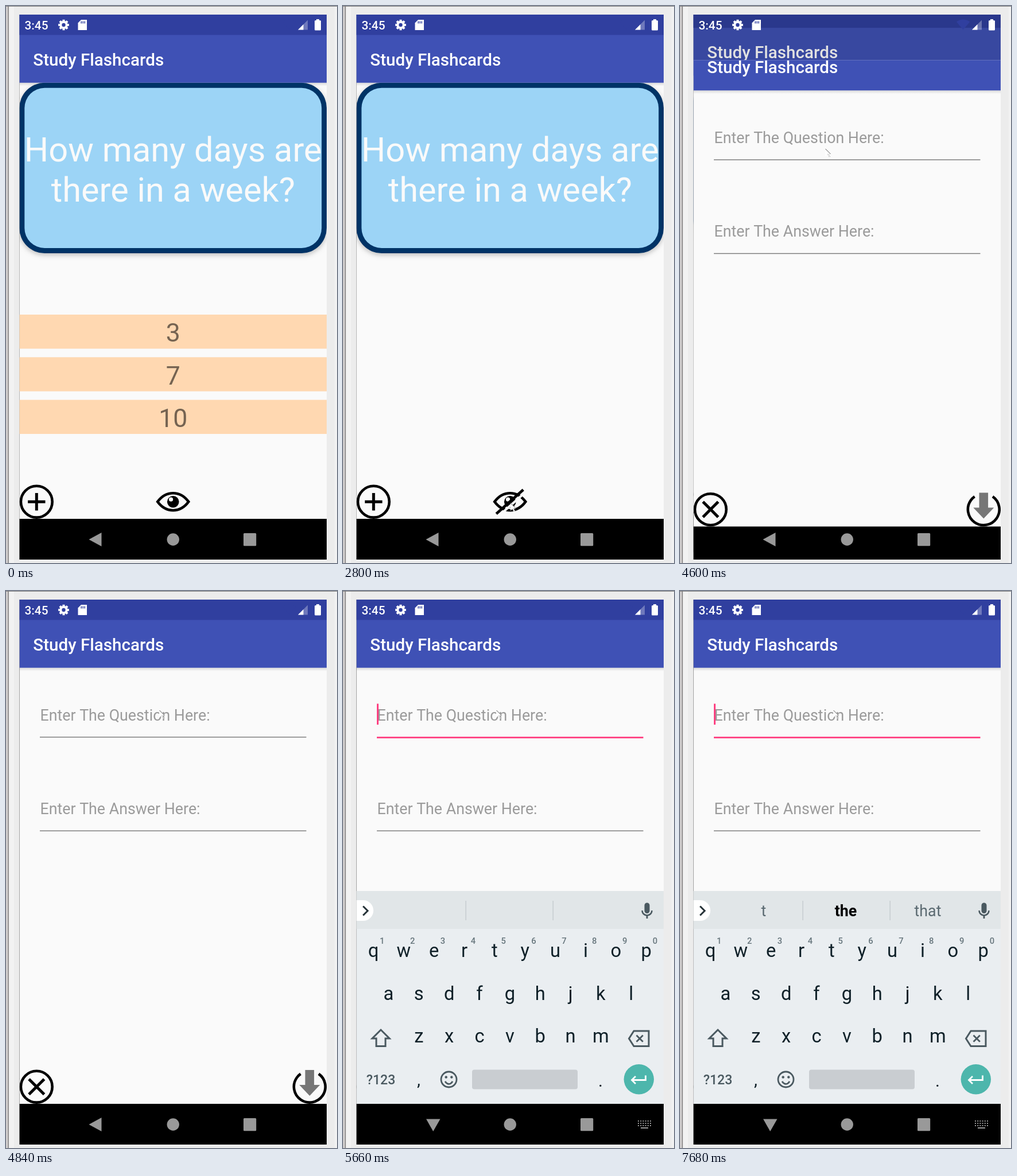
Write an HTML page with a canvas that moves like this. It is 577 by 971 pixels and loops after 8000 ms.

```html
<!DOCTYPE html>
<html lang="en">
<head>
<meta charset="utf-8">
<title>Study Flashcards</title>
<style>
html, body { margin: 0; width: 100%; height: 100%; overflow: hidden; background: #ececec; }
canvas { display: block; width: 577px; height: 971px; }
</style>
</head>
<body>
<canvas id="stage" width="577" height="971"></canvas>
<script>
const ctx = document.getElementById('stage').getContext('2d');
const LOOP = 8000, FRAME = 120, KEY_GAP = 75;
const L = 23.3, R = 559, T = 15, B = 965, BAR = 50.5, BODY = 133.8, NAV = 894, MID = 291.25;
const PINK = '#ff4081', PAPER = '#fafafa', SLATE = '#4a5960', INK = '#0f2028', BLACK = '#000', WHITE = '#fff';
const FIELD = 26.775, ICON_Y = 864.2, ICON_L = L + 30, ICON_R = R - 29.7;

const REVEAL = 2800, FOCUS = 5270, IME = 5420, CLEAR = 7560;
const moves = [
  { start: 1210, span: 840, from: [541, 538], to: [292, 866], lift: 0 },
  { start: 3240, span: 720, from: [292, 866], to: [56, 853], lift: 36 },
  { start: 4240, span: 600, from: [56, 853], to: [267, 207], lift: 0 }
];
const words = [
  { start: 6090, word: 'How ', hints: ['are', 'many', 'much'] },
  { start: 6630, word: 'is ', hints: ['t', 'the', 'that'] },
  { start: 7030, word: 't' }
];

// Progress 0..1 of a motion, held for a whole frame at a time.
const progress = (t, start, span) =>
  Math.min(1, Math.max(0, Math.floor((t - start) / FRAME) * FRAME / span));
const easeOut = k => 1 - (1 - k) ** 3;
const easeSlide = k => 1 - (1 - k ** 3) ** 8;

function box(x, y, x2, y2, color) {
  ctx.fillStyle = color;
  ctx.fillRect(x, y, x2 - x, y2 - y);
}
function round(x, y, x2, y2, r, color) {
  ctx.fillStyle = color;
  ctx.beginPath();
  ctx.roundRect(x, y, x2 - x, y2 - y, r);
  ctx.fill();
}
function disc(x, y, r, color) {
  ctx.fillStyle = color;
  ctx.beginPath();
  ctx.arc(x, y, r, 0, 7);
  ctx.fill();
}
function stroke(width, color) {
  ctx.lineWidth = width;
  ctx.strokeStyle = color;
  ctx.stroke();
}
function ring(x, y, r, width, color, from = 0, to = Math.PI * 2) {
  ctx.beginPath();
  ctx.arc(x, y, r, from, to);
  stroke(width, color);
}
function trace(points) {
  ctx.beginPath();
  points.forEach(p => ctx.lineTo(...p));
}
function poly(points, color) {
  trace(points);
  ctx.fillStyle = color;
  ctx.fill();
}
function line(points, width, color) {
  trace(points);
  stroke(width, color);
}
function spokes(x, y, count, r, width, color, turn = 0) {
  for (let i = 0; i < count; i++) {
    const a = turn + i * 2 * Math.PI / count;
    line([[x, y], [x + r * Math.cos(a), y + r * Math.sin(a)]], width, color);
  }
}
function chevron(x, y, w, width, color) {
  line([[x - w, y - Math.abs(w)], [x, y], [x - w, y + Math.abs(w)]], width, color);
}
function blockArrow(x, tip, neck, end, half, stem) {
  const side = [[stem, end], [stem, neck], [half, neck]];
  trace([[x, tip], ...side.map(([d, y]) => [x - d, y]).reverse(), ...side.map(([d, y]) => [x + d, y])]);
  ctx.closePath();
}
function text(str, x, y, size, color, align = 'left', weight = 400) {
  ctx.font = `${weight} ${size}px Roboto, sans-serif`;
  ctx.textAlign = align;
  ctx.fillStyle = color;
  ctx.fillText(str, x, y);
}
function clipped(x, y, x2, y2, paint) {
  ctx.save();
  ctx.beginPath();
  ctx.rect(x, y, x2 - x, y2 - y);
  ctx.clip();
  paint();
  ctx.restore();
}

function bezel() {
  box(0, 0, 577, 971, '#ececec');
  box(5, 1, 14, 971, '#f2f2f2');
  box(573, 1, 577, 971, '#f2f2f2');
  box(0, 0, 4, 971, '#cfcccc');
  box(3.5, 0, 5, 971, '#858383');
  box(0, 0, 577, 1, '#7d7d7d');
}

function appFrame() {
  box(L, T, R, B, PAPER);
  const fade = ctx.createLinearGradient(0, BODY, 0, BODY + 6);
  fade.addColorStop(0, 'rgba(0,0,0,.13)');
  fade.addColorStop(1, 'rgba(0,0,0,0)');
  box(L, BODY, R, BODY + 6, fade);
  box(L, T, R, BODY, '#3f51b5');
  box(L, T, R, BAR, '#303f9f');
  text('Study Flashcards', 47.3, 103.5, 29.6, WHITE, 'left', 500);
  box(L, NAV, R, B, BLACK);
}

function card() {
  clipped(L, BODY, R, 454, () => {
    ctx.shadowColor = 'rgba(0,0,0,.25)';
    ctx.shadowBlur = 9;
    ctx.shadowOffsetY = 3;
    round(L, BODY, R, 431, 44, '#003366');
  });
  round(L + 9, BODY + 9, R - 8.8, 422, 35, '#9cd4f6');
  text('How many days are', MID, 271, 59.5, PAPER, 'center');
  text('there in a week?', MID, 341, 59.5, PAPER, 'center');
}

function eye(x, y, hidden) {
  ctx.beginPath();
  ctx.moveTo(x - 27, y);
  ctx.bezierCurveTo(x - 12.5, y - 20, x + 12.5, y - 20, x + 27, y);
  ctx.bezierCurveTo(x + 12.5, y + 20, x - 12.5, y + 20, x - 27, y);
  ctx.closePath();
  stroke(4.6, BLACK);
  disc(x, y, 10.3, BLACK);
  disc(x - 3.7, y - 4, 3.6, PAPER);
  if (!hidden) return;
  line([[x + 27, y - 17], [x - 20, y + 25]], 4, PAPER);
  line([[x + 23, y - 21], [x - 24, y + 21]], 4.8, BLACK);
}

function home(t) {
  appFrame();
  card();
  if (t < REVEAL) ['3', '7', '10'].forEach((answer, i) => {
    const y = 538 + i * 74.3;
    box(L, y, R, y + 59.4, '#ffd8b1');
    text(answer, MID, y + 47.3, 44.6, '#756351', 'center');
  });
  ring(ICON_L, ICON_Y, 27.4, 4.6, BLACK);
  spokes(ICON_L, ICON_Y, 4, 15.2, 5, BLACK);
  eye(MID, ICON_Y, t >= REVEAL);
}

function underline(y, color, width) {
  box(59, y, 523.5, y + width, color);
}

function form(t) {
  appFrame();
  const begun = words.filter(w => t >= w.start && t < CLEAR);
  const entry = begun.map(w => w.word.slice(0, 1 + (t - w.start) / KEY_GAP)).join('');
  text(entry || 'Enter The Question Here:', 59.5, 225.5, FIELD, entry ? '#212121' : '#9b9b9b');
  text('Enter The Answer Here:', 59.5, 389, FIELD, '#9b9b9b');
  underline(417.4, '#777', 1.4);

  if (t < FOCUS) underline(254, '#777', 1.4);
  else {
    underline(254, PINK, 2.8);
    const edit = t >= CLEAR ? CLEAR : begun.length ? begun.at(-1).start : FOCUS;
    ctx.font = `400 ${FIELD}px Roboto, sans-serif`;
    const x = 59 + ctx.measureText(entry).width;
    if ((t - edit) % 1000 < 535) box(x, 196.5, x + 3, 233, PINK);
  }

  ring(ICON_L, ICON_Y, 27.4, 4.6, BLACK);
  spokes(ICON_L, ICON_Y, 4, 18.8, 5, BLACK, Math.PI / 4);
  ring(ICON_R, ICON_Y, 27.4, 4.6, BLACK, -0.96, Math.PI + 0.96);
  blockArrow(ICON_R, 880, 861, 835, 18, 7.8);
  ctx.fill();
}

function statusIcons() {
  text('3:45', 32.5, 41, 20.8, WHITE, 'left', 500);
  spokes(100.5, 33, 8, 9.3, 4, WHITE);
  disc(100.5, 33, 7.2, WHITE);
  disc(100.5, 33, 3.2, '#303f9f');
  poly([[131, 24], [141, 24], [141, 42], [125.5, 42], [125.5, 29.5]], WHITE);
  for (let x = 130.5; x < 138; x += 3) box(x, 26.5, x + 1.5, 30.5, '#303f9f');
  ctx.beginPath();
  ctx.moveTo(493.5, 41.5);
  ctx.lineTo(482, 27.5);
  ctx.quadraticCurveTo(493.5, 19.5, 505.3, 27.5);
  ctx.fill();
  const wedge = (size, color) => poly([[509, 41.5], [509 + size, 41.5], [509 + size, 41.5 - size]], color);
  wedge(17, 'rgba(255,255,255,.3)');
  wedge(9.5, WHITE);
  round(538, 25, 549, 42.5, 1.5, WHITE);
  box(541, 23, 546, 26, WHITE);
}

function navIcons(typing) {
  const gray = '#999';
  if (typing) poly([[145, 920.5], [169.5, 920.5], [157.2, 942]], gray);
  else poly([[144.5, 930], [166.5, 918], [166.5, 942]], gray);
  disc(MID, 930, 10.7, gray);
  round(414, 919, 436.2, 941.3, 1.5, gray);
  if (!typing) return;
  for (let y = 923; y < 935; y += 4)
    for (let x = 514; x < 537; x += 4.2) box(x, y, x + 2, y + 2, gray);
  box(519, 935, 532, 937, gray);
}

function keyboard(hints) {
  box(L, 523, R, NAV, '#eaeef1');
  box(L, 523, R, 589, '#e1e6e8');
  round(L, 539, 53, 575, [0, 18, 18, 0], WHITE);
  chevron(43, 557.5, 8, 3, '#263238');
  hints.forEach((hint, i) => {
    const best = hint === 'the';
    text(hint, 146 + i * 143, 567, FIELD, best ? BLACK : '#5b6a71', 'center', best ? 700 : 400);
  });
  for (const x of [213.5, 365.5]) box(x, 540, x + 1.3, 574, '#c2c9cc');
  round(525.5, 543.5, 534.5, 562, 4.5, SLATE);
  ring(530, 557, 8.5, 2.6, SLATE, 0, Math.PI);
  box(528.6, 565, 531.4, 571, SLATE);

  ['qwertyuiop', 'asdfghjkl', 'zxcvbnm'].forEach((keys, row) => {
    [...keys].forEach((key, i) => {
      const x = MID - 0.4 + (i - (keys.length - 1) / 2) * 52.85;
      text(key, x, 638 + row * 74.5, 32.7, INK, 'center');
      if (!row) text((i + 1) % 10, x + 15.3, 615, 14.8, '#66757c', 'center', 500);
    });
  });

  blockArrow(66, 765, 780, 793.5, 15, 8);
  stroke(3, SLATE);
  trace([[507, 767], [533, 767], [533, 793.5], [507, 793.5], [498.5, 780.2]]);
  ctx.closePath();
  stroke(3, SLATE);
  spokes(517.2, 780.2, 4, 8, 2.8, SLATE, Math.PI / 4);

  text('?123', 66, 860, 23, SLATE, 'center', 500);
  text(',', 132, 862, 30, INK, 'center');
  text('.', 449, 864, 30, INK, 'center');
  ring(184.5, 851.5, 13.5, 2.8, SLATE);
  for (const side of [-1, 1]) disc(184.5 + side * 4.8, 847.5, 2.2, SLATE);
  ring(184.5, 852.5, 6.8, 2.8, SLATE, 0.35, Math.PI - 0.35);
  round(225, 834.5, 409, 868.5, 4, '#c9cdd1');
  disc(515.8, 851.2, 26.2, '#4db6ac');
  line([[527.5, 844.5], [527.5, 852.5], [504, 852.5]], 2.8, WHITE);
  chevron(503.5, 852.5, -6.5, 2.8, WHITE);
}

function screen(t) {
  const p = easeSlide(progress(t, 4360, 480));
  box(L, T, R, B, BLACK);
  if (p < 1) {
    ctx.save();
    ctx.translate(0, -19 * p);
    home(t);
    ctx.restore();
    box(L, T, R, NAV, `rgba(0,0,0,${0.18 * p})`);
  }
  if (p > 0) {
    const drop = 39 * (1 - p);
    clipped(L, T + drop + (B - T) * (1 - p) ** 2.5, R, B, () => {
      ctx.translate(0, drop);
      form(t);
    });
  }
  const shown = easeOut(progress(t, IME, 240));
  const done = words.filter(w => w.hints && t >= w.start + (w.word.length - 1) * KEY_GAP);
  if (shown) clipped(L, T, R, NAV, () => {
    ctx.globalAlpha = shown;
    ctx.translate(0, 37 * (1 - shown));
    keyboard(done.length ? done.at(-1).hints : []);
  });
  statusIcons();
  navIcons(t >= IME);
}

function pointer(t) {
  const move = moves.filter(m => t >= m.start).at(-1);
  if (!move) return;
  const { start, span, from, to, lift } = move;
  const k = easeOut(progress(t, start, span));
  const [x, y] = from.map((v, i) => Math.round(v + (to[i] - v) * k));
  ctx.save();
  ctx.translate(x, y - Math.round(lift * Math.sin(Math.PI * k)));
  poly([[0, 0], [0, 14], [3, 11], [6, 16], [8, 15], [5.5, 10], [10, 10]], WHITE);
  line([[0.5, 1], [9.5, 10]], 0.9, '#444');
  for (let i = 0; i < 3; i++) {
    box(4 + i, 10 + 2 * i, 5 + i, 11 + 2 * i, '#999');
    box(6 + i, 10 + 2 * i, 7 + i, 11 + 2 * i, '#999');
  }
  ctx.restore();
}

const begin = performance.now();
function draw() {
  const t = (performance.now() - begin) % LOOP;
  bezel();
  clipped(L, T, R, B, () => screen(t));
  pointer(t);
  requestAnimationFrame(draw);
}
draw();
</script>
</body>
</html>
```
